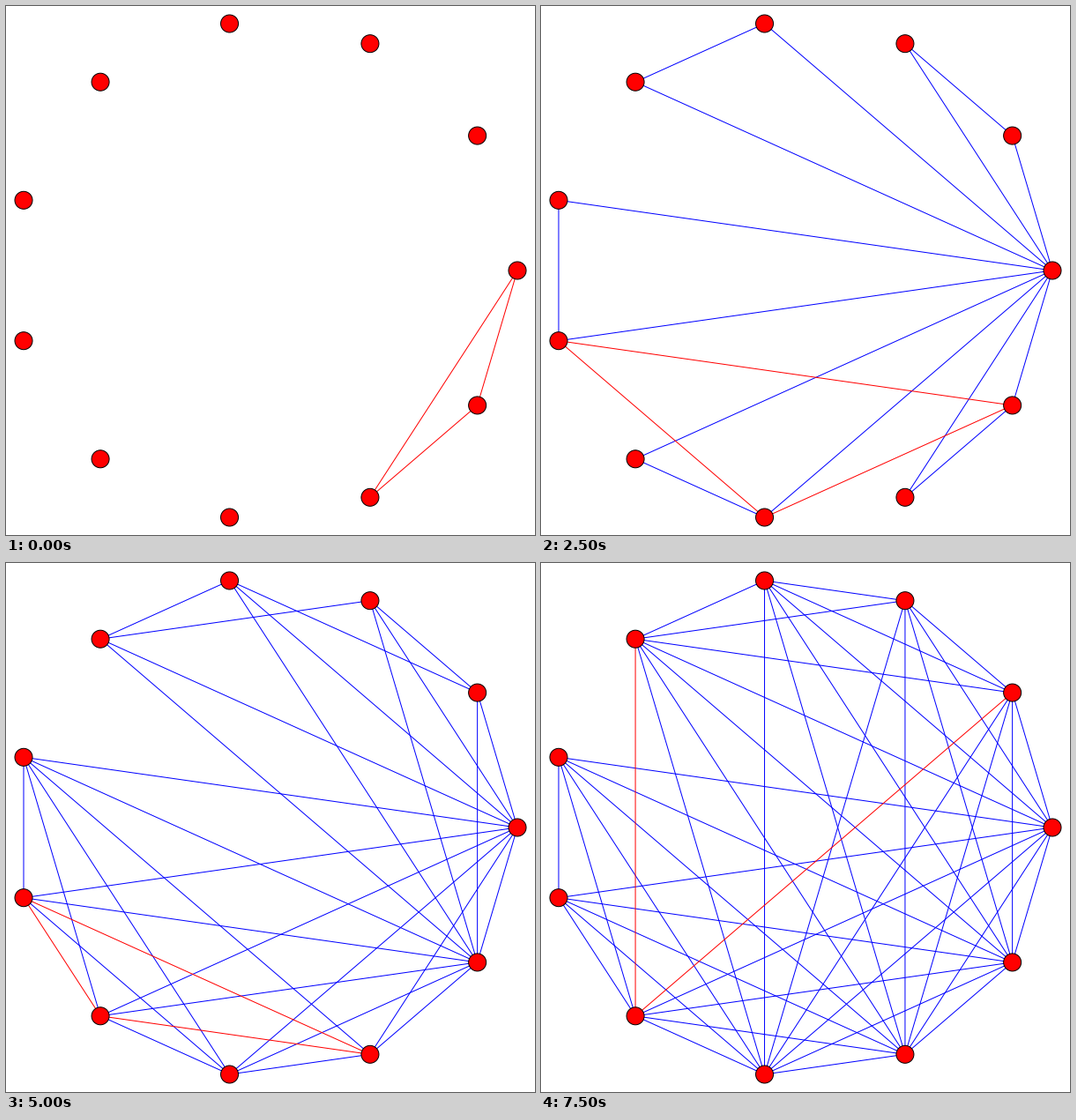
These frames come from a looping animation (600x600 px, 8 s). A matplotlib script:

```python
from itertools import combinations

import matplotlib.pyplot as plt
import numpy as np
from matplotlib.animation import FuncAnimation
from matplotlib.collections import LineCollection
from matplotlib.patches import Circle

SIZE, DPI, MARGIN, N = 600, 100, 20, 11
STEPS, STEP_MS = 16, 500
PX = 72 / DPI  # one pixel in points


def fit(v):
    """Scale values to fill the stage between its margins."""
    return MARGIN + (v - v.min()) / np.ptp(v) * (SIZE - 2 * MARGIN)


def cover(count):
    """Cover the edges of K_N by triangles; return the new edges of each one."""
    used, steps = set(), []

    def fresh(tri):
        return [e for e in combinations(tri, 2) if e not in used]

    def add(tri):
        new = fresh(tri)
        used.update(new)
        steps.append(new)

    for tri in combinations(range(N), 3):
        if len(fresh(tri)) == 3:
            add(tri)
    # No disjoint triangle is left: each open edge takes its best partner.
    for a, b in combinations(range(N), 2):
        if (a, b) not in used:
            thirds = [tuple(sorted((a, b, c)))
                      for c in range(N) if c not in (a, b)]
            add(max(reversed(thirds), key=lambda t: len(fresh(t))))
    return steps[:count]


angle = 2 * np.pi * np.arange(N) / N
points = np.column_stack([fit(np.cos(angle)), fit(np.sin(angle))])
steps = cover(STEPS)

fig = plt.figure(figsize=(SIZE / DPI, SIZE / DPI), dpi=DPI, facecolor="white")
ax = fig.add_axes([0, 0, 1, 1])
ax.set_xlim(0, SIZE)
ax.set_ylim(SIZE, 0)
ax.axis("off")


def edge_layer(color, z):
    layer = LineCollection([], colors=color, linewidths=PX, zorder=z)
    layer.set_snap(False)
    return ax.add_collection(layer, autolim=False)


old = edge_layer("#0000ff", 1)
new = edge_layer("#ff0000", 2)
for p in points:
    ax.add_patch(Circle(p, 10, facecolor="#ff0000", edgecolor="black",
                        linewidth=PX, zorder=3))


def segments(edges):
    return [points[list(e)] for e in edges]


def draw(i):
    old.set_segments(segments(e for s in steps[:i] for e in s))
    new.set_segments(segments(steps[i]))
    return old, new


anim = FuncAnimation(fig, draw, frames=STEPS, init_func=lambda: draw(0),
                     interval=STEP_MS, repeat=True, repeat_delay=0)
plt.show()
```
